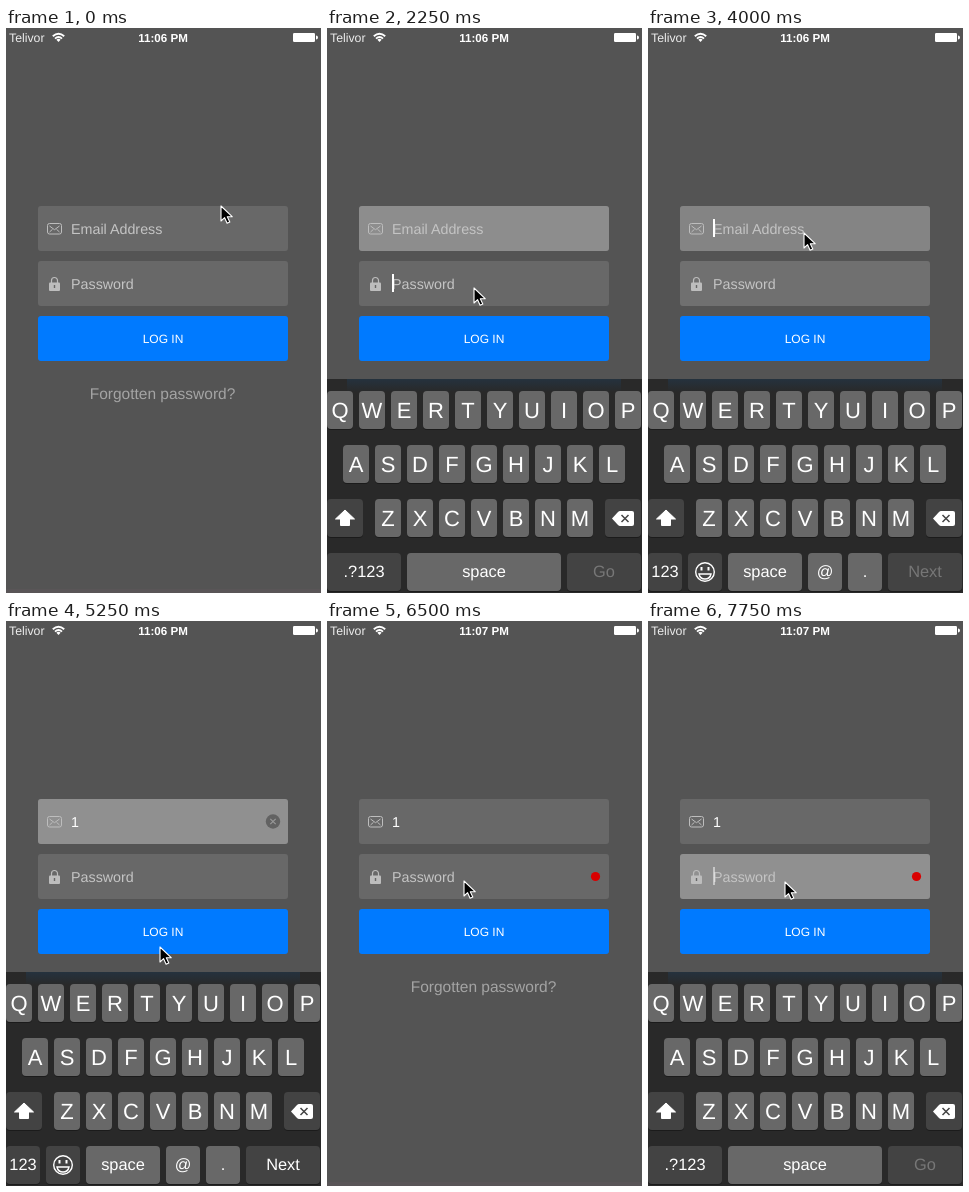
An HTML page for the animation above (8 s loop, 315x565 px).

```html
<!DOCTYPE html>
<html lang="en">
<head>
<meta charset="utf-8">
<title>Login form</title>
<style>
  html, body { margin: 0; width: 100%; height: 100%; overflow: hidden; background: #545454; }
  svg { display: block; width: 100%; height: 100%; }
  text { font-family: "Liberation Sans", Arial, sans-serif; fill: #fff; text-rendering: geometricPrecision; }
  .field { fill: #686868; }
  .glow { fill: #909090; }
  .hint { font-size: 14.3px; fill: #c4c4c4; }
  .icon { fill: none; stroke: #bdbdbd; }
  .mid { text-anchor: middle; }
  .letter { font-size: 22px; }
  .word { font-size: 16.4px; }
</style>
</head>
<body>
<svg viewBox="0 0 315 565">
  <rect width="315" height="565" fill="#545454"/>
  <rect y="561" width="315" height="4" fill="#595557"/>

  <text x="3" y="14" font-size="12.3" style="fill:#ececec">Telivor</text>
  <g fill="none" stroke="#fff" stroke-width="1.9">
    <path d="M46.8 8.3Q52.5 3.2 58.2 8.3M49 10.6Q52.5 7.5 56 10.6"/>
    <path d="M50.4 11.7Q52.5 10 54.6 11.7L52.5 14Z" fill="#fff" stroke="none"/>
  </g>
  <text id="clock" class="mid" x="157" y="14" font-size="11.6" font-weight="700"></text>
  <rect x="287" y="5" width="22" height="9" rx="1.2" fill="#fff"/>
  <path d="M310 7.5q2 0 2 2t-2 2z" fill="#fff"/>

  <rect class="field" x="32" y="178" width="250" height="45" rx="3"/>
  <rect class="glow" id="emailGlow" x="32" y="178" width="250" height="45" rx="3"/>
  <g class="icon">
    <rect x="41.5" y="195.5" width="14" height="10.5" rx="2"/>
    <path d="M43.5 198l5 3.7l5-3.7M43.5 204l3-2.7M53.500 204l-3-2.7"/>
  </g>
  <text class="hint" id="emailHint" x="65" y="206">Email Address</text>
  <text id="typed" x="65" y="206" font-size="14.3">1</text>
  <g id="clear">
    <circle cx="267" cy="200.500" r="7.2" fill="#626262"/>
    <path d="M264.300 197.800l5.400 5.400m0-5.400l-5.400 5.400" stroke="#989898" stroke-width="1.2"/>
  </g>

  <rect class="field" x="32" y="233" width="250" height="45" rx="3"/>
  <rect class="glow" id="passGlow" x="32" y="233" width="250" height="45" rx="3"/>
  <path class="icon" d="M45.500 255v-2.500a3 3 0 0 1 6 0v2.500" stroke-width="1.2"/>
  <rect x="43" y="254.500" width="11" height="8.500" rx="1" fill="#bdbdbd"/>
  <path d="M48.500 257v3" stroke="#666" stroke-width="1.4"/>
  <text class="hint" x="65" y="261">Password</text>
  <circle id="error" cx="268.500" cy="255.500" r="4.600" fill="#d90000"/>
  <rect id="caret" width="2" height="18" fill="#fff"/>

  <rect x="32" y="288" width="250" height="45" rx="3" fill="#007aff"/>
  <text class="mid" x="157" y="315" font-size="12">LOG IN</text>
  <text class="mid" x="156.500" y="371" font-size="15.500" style="fill:#a4a4a4">Forgotten password?</text>

  <defs>
    <linearGradient id="tint" x2="0" y2="1">
      <stop stop-color="#25323e"/><stop offset="1" stop-color="#292929"/>
    </linearGradient>
  </defs>
  <g id="keyboard">
    <rect y="351" width="315" height="214" fill="#292929"/>
    <rect x="20" y="351" width="274" height="13" fill="url(#tint)"/>
    <g id="letters"></g>
    <g id="emailRow"></g>
    <g id="passRow"></g>
    <path d="M18 482l9.500 9h-5v6.500h-9v-6.500h-5z" fill="#fff" stroke="#fff" stroke-linejoin="round"/>
    <path d="M285 490.500l6-6.500q1-1 2-1h12q2 0 2 2v11q0 2-2 2h-12q-1 0-2-1z" fill="#fff"/>
    <path d="M294.500 487l7 7m0-7l-7 7" stroke="#444" stroke-width="1.500"/>
  </g>

  <path id="cursor" d="M0 0v15l3.600-3.300l2.500 5.600l2.700-1.200l-2.500-5.400h4.900z"
        fill="#000" stroke="#fff" stroke-width="1.1" stroke-linejoin="round"/>
</svg>
<script>
const $ = id => document.getElementById(id);
const TICK = 250, TICKS = 32;

const key = (x, y, w, label, kind = 'word', fill = '#686868') => `
  <rect x="${x}" y="${y + 1}" width="${w}" height="38" rx="4" fill="#1b1b1b"/>
  <rect x="${x}" y="${y}" width="${w}" height="38" rx="4" fill="${fill}"/>
  <text class="mid ${kind}" x="${x + w / 2}" y="${y + (kind === 'letter' ? 27 : 24)}">${label}</text>`;
const darkKey = (x, y, w, label) => key(x, y, w, label, 'word', '#434343');
const letterRow = (chars, x, y) =>
  [...chars].map((c, i) => key(x + 32 * i, y, 26, c, 'letter')).join('');

$('letters').innerHTML =
  letterRow('QWERTYUIOP', 0, 363) + letterRow('ASDFGHJKL', 16, 417) + letterRow('ZXCVBNM', 48, 471) +
  darkKey(0, 471, 36, '') + darkKey(278, 471, 36, '');
$('emailRow').innerHTML =
  darkKey(0, 525, 34, '123') + darkKey(40, 525, 34, '') + key(80, 525, 74, 'space') +
  key(160, 525, 34, '@') + key(200, 525, 34, '.') + darkKey(240, 525, 74, 'Next') +
  `<g fill="none" stroke="#fff" stroke-width="1.4"><circle cx="57" cy="544" r="9.300"/>
   <path d="M51 546h12q-1 5-6 5t-6-5z"/></g>
   <path d="M53.500 539v3.500m7-3.500v3.500" stroke="#fff" stroke-width="2"/>`;
$('passRow').innerHTML =
  darkKey(0, 525, 74, '.?123') + key(80, 525, 154, 'space') + darkKey(240, 525, 74, 'Go');
const nextLabel = $('emailRow').querySelectorAll('text')[5];
const goLabel = $('passRow').querySelectorAll('text')[2];
goLabel.style.fill = '#777';

// Keys are [tick, value, ...]; values are linear between them.
const tracks = {
  cursor: [[0, 215, 178], [3, 163, 205], [7, 163, 205], [9, 147, 260], [14, 147, 260], [16, 156, 205],
           [18, 156, 205], [21, 154, 326], [24, 154, 326], [26, 137, 260], [31, 137, 261]],
  keyboard: [[2, 214], [3, 150], [4, 14], [5, 0], [21, 0], [22, 120], [23, 214], [27, 214], [28, 50], [29, 0]],
  emailGlow: [[2, 0], [3, .6], [4, 1], [9, .95], [10, 0], [15, 0], [16, .7], [17, 1], [21, 1], [22, .3], [23, 0]],
  passGlow: [[9, 0], [10, 1], [15, 1], [16, .2], [17, 0], [27, 0], [28, .7], [29, 1]]
};
function at(track, t) {
  const i = track.findIndex(k => k[0] > t);
  if (i === 0) return track[0].slice(1);
  if (i < 0) return track[track.length - 1].slice(1);
  const a = track[i - 1], b = track[i], f = (t - a[0]) / (b[0] - a[0]);
  return a.slice(1).map((v, j) => v + (b[j + 1] - v) * f);
}
const show = (id, on) => { $(id).style.display = on ? '' : 'none'; };

function draw(t) {
  const onPass = (t >= 9 && t < 16) || t >= 27;
  const typed = t >= 19;
  const focused = (t >= 4 && t < 22) || t >= 28;
  const blinkStart = [28, 19, 16, 9, 4].find(s => s <= t) || 0;

  $('cursor').setAttribute('transform', `translate(${at(tracks.cursor, t).map(Math.round)})`);
  $('keyboard').setAttribute('transform', `translate(0 ${at(tracks.keyboard, t)})`);
  for (const id of ['emailGlow', 'passGlow']) $(id).style.opacity = at(tracks[id], t);

  $('clock').textContent = t < 25 ? '11:06 PM' : '11:07 PM';
  show('emailHint', !typed);
  show('typed', typed);
  show('clear', typed && t < 22);
  show('error', t >= 22);
  show('emailRow', !onPass);
  show('passRow', onPass);
  nextLabel.style.fill = typed ? '#fff' : '#777';

  $('caret').setAttribute('x', typed && !onPass ? 74 : 65);
  $('caret').setAttribute('y', onPass ? 246 : 191);
  $('caret').style.opacity = focused ? [1, 1, 0, .5][(t - blinkStart) % 4] : 0;
}

const start = performance.now();
function loop() {
  draw(Math.floor((performance.now() - start) / TICK) % TICKS);
  requestAnimationFrame(loop);
}
loop();
</script>
</body>
</html>
```
